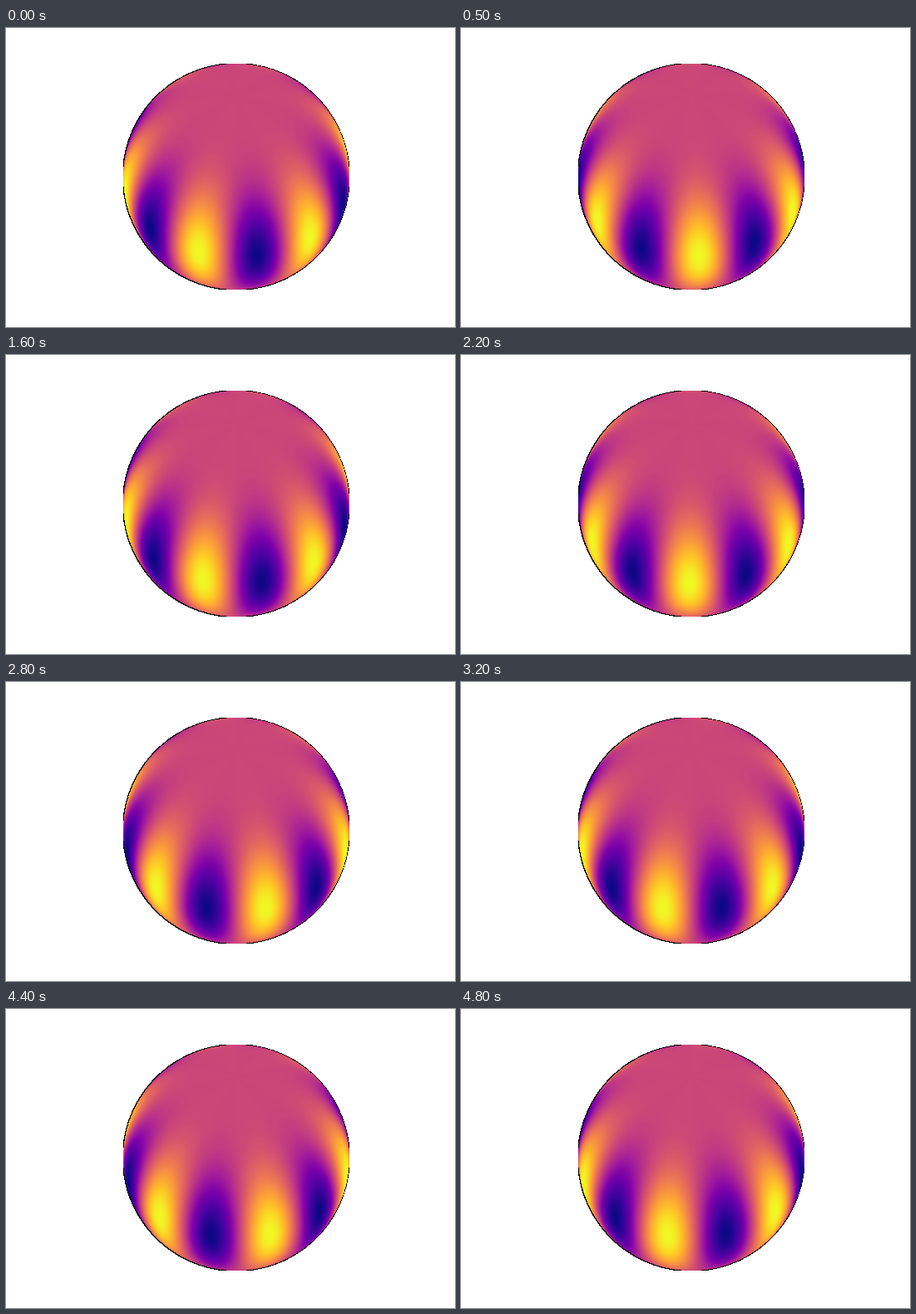
These frames come from a looping animation (540x360 px, 4900 ms). A matplotlib script:

```python
import numpy as np
import matplotlib.pyplot as plt
from matplotlib.animation import FuncAnimation
from matplotlib.patches import Circle

FRAMES = 49
ORDER = 6                 # waves around the globe
TILT = np.radians(45)     # latitude at the centre of the view
START = 10.6              # longitude of the first trough, degrees
SIZE = 816

# Orthographic view of the unit sphere: x east, y north, z towards the viewer
axis = (np.arange(SIZE) + 0.5) / SIZE * 2 - 1
x, y = np.meshgrid(axis, axis)
r2 = x**2 + y**2
z = np.sqrt(np.where(r2 <= 1, 1 - r2, np.nan))

# Sectoral harmonic: cos(lat)^m * exp(i m lon)
wave = (z * np.cos(TILT) - y * np.sin(TILT) + 1j * x) ** ORDER


def field(k):
    trough = np.radians(START - 360 * k / FRAMES)
    return np.ma.masked_invalid(-(wave * np.exp(-1j * ORDER * trough)).real)


fig, ax = plt.subplots(figsize=(6, 4), dpi=90, facecolor="white")
fig.subplots_adjust(left=0.125, right=0.9, bottom=0.125, top=0.88)

# The globe covers the inner half of its outline
ax.add_patch(Circle((0, 0), 1, fill=False, ec="black", lw=1,
                    antialiased=False, zorder=1))
image = ax.imshow(field(0), cmap="plasma", vmin=-1, vmax=1, origin="lower",
                  extent=(-1, 1, -1, 1), interpolation="nearest", zorder=2)
ax.set(xlim=(-1, 1), ylim=(-1, 1))
ax.axis("off")


def update(k):
    image.set_data(field(k))
    return (image,)


anim = FuncAnimation(fig, update, frames=FRAMES, interval=100, repeat=True,
                     repeat_delay=0)
plt.show()
```
